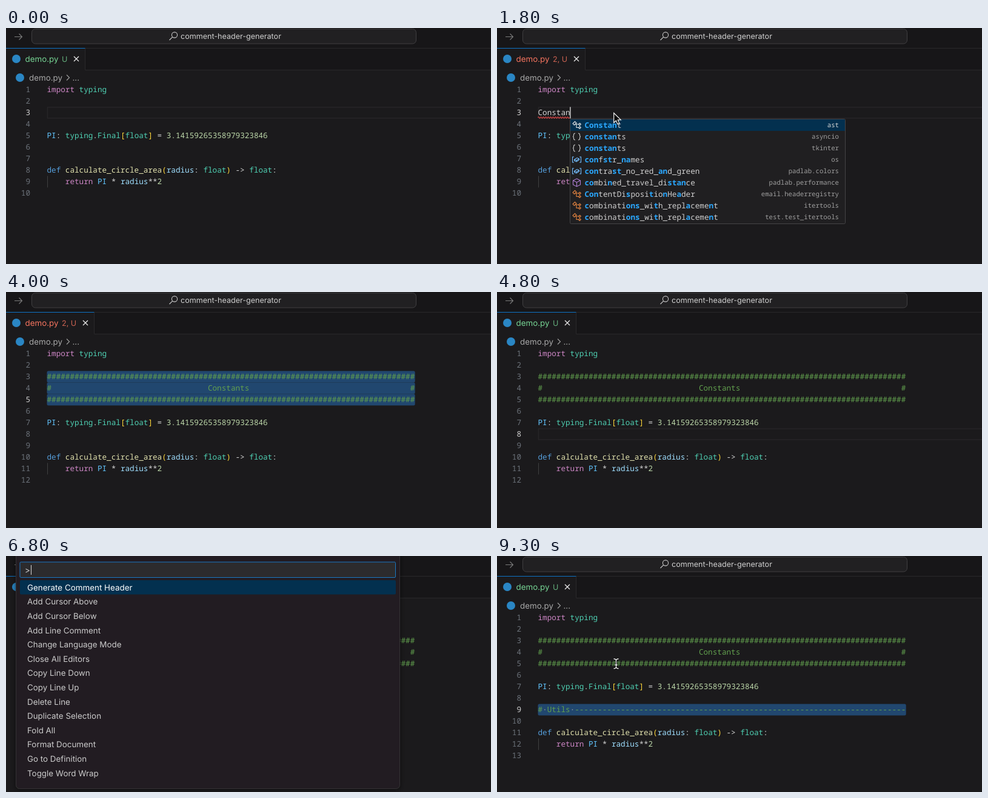
An HTML page that plays this animation: 800 by 390 pixels, repeating every 9.4 s.

```html
<!DOCTYPE html>
<html lang="en">
<head>
<meta charset="utf-8">
<title>Editor demo</title>
<style>
html, body { margin: 0; width: 100%; height: 100%; overflow: hidden; background: #1b1a1c; }
svg { display: block; width: 800px; height: 390px; }
text { white-space: pre; text-rendering: geometricPrecision; font-variant-ligatures: none; }
.ui { font-family: Inter, sans-serif; font-size: 13.4px; }
.code { font-family: "Noto Sans Mono", monospace; font-size: 12.65px; font-weight: 500; }
.small { font-family: "Noto Sans Mono", monospace; font-size: 10.7px; font-weight: 500; }
</style>
</head>
<body>
<svg id="stage" viewBox="0 0 800 390"></svg>
<script>
const stage = document.getElementById('stage');
const LOOP = 9400, STEP = 100, LEFT = 67.5, CHAR = 7.59, ROW = 19;
const C = {
  bg: '#1b1a1c', bar: '#171618', line: '#2a292b',
  key: '#cd86c5', type: '#4fd0b3', name: '#62c6ff', arg: '#9fdfff', num: '#bbd6a8',
  def: '#569fdc', fn: '#e2e2ae', par: '#ffd83a', note: '#62a04e', text: '#d6d6d6',
  blue: '#2aa8ff', pick: '#03304f', sel: '#21476f', dimSel: '#414143', red: '#f14c4c'
};

const esc = s => s.replace(/&/g, '&amp;').replace(/</g, '&lt;').replace(/>/g, '&gt;');
const span = (fill, s, extra = '') => `<tspan fill="${fill}" ${extra}>${esc(s)}</tspan>`;
const label = (cls, x, y, fill, s, extra = '') =>
  `<text class="${cls}" x="${x}" y="${y}" fill="${fill}" ${extra}>${esc(s)}</text>`;
const rect = (x, y, w, h, fill, extra = '') =>
  `<rect x="${x}" y="${y}" width="${w}" height="${h}" fill="${fill}" ${extra}/>`;
const path = (d, stroke, w = 1, fill = 'none', extra = '') =>
  `<path d="${d}" stroke="${stroke}" stroke-width="${w}" fill="${fill}" ${extra}/>`;
const mid = n => 102 + ROW * (n - 1);
const colX = n => LEFT + CHAR * n;
// Last entry [time, value] whose time has passed
const at = (t, list) => list.reduce((v, [from, to]) => t >= from ? to : v, list[0][1]);

// ---- document text ----
const IMPORT = [[C.key, 'import '], [C.type, 'typing']];
const CONST = [[C.name, 'PI'], [C.text, ': '], [C.type, 'typing'], [C.text, '.'], [C.type, 'Final'],
  [C.par, '['], [C.type, 'float'], [C.par, ']'], [C.text, ' = '], [C.num, '3.14159265358979323846']];
const DEF = [[C.def, 'def '], [C.fn, 'calculate_circle_area'], [C.par, '('], [C.arg, 'radius'],
  [C.text, ': '], [C.type, 'float'], [C.par, ')'], [C.text, ' -> '], [C.type, 'float'], [C.text, ':']];
const RET = [[C.key, '    return '], [C.name, 'PI'], [C.text, ' * '], [C.arg, 'radius'],
  [C.text, '**'], [C.num, '2']];
const note = s => [[C.note, s]];
const BAR = note('#'.repeat(80));
const HEAD = [BAR, note('#' + ' '.repeat(34) + 'Constants' + ' '.repeat(35) + '#'), BAR];
const UTIL = note('# Utils ' + '-'.repeat(72));

// ---- completion lists: brackets mark matched letters ----
const FIRST = [
  ['class', '[Constan]t', 'ast'], ['mod', '[constan]ts', 'asyncio'], ['mod', '[constan]ts', 'tkinter'],
  ['var', '[con]f[st]r_[na]mes', 'os'], ['var', '[con]tra[st]_no_red_[an]d_green', 'padlab.colors'],
  ['cube', '[co]mbi[n]ed_travel_di[stan]ce', 'padlab.performance'],
  ['class', '[Con]tentDi[s]posi[t]io[n]He[a]der', 'email.headerregistry'],
  ['class', '[c]ombinati[ons]_wi[t]h_repl[a]ceme[n]t', 'itertools'],
  ['class', '[c]ombinati[ons]_wi[t]h_repl[a]ceme[n]t', 'test.test_itertools'],
  ['class', '[Con]nectionError', ''], ['class', '[Con]nectionResetError', ''], ['class', '[Con]textDecorator', 'contextlib']
];
const SECOND = [
  ['mod', '[utils]', 'email'], ['cube', '[u]pda[t]e_[li]ne[s]_cols', 'curses'],
  ['var', '_[U]ninstan[ti]ab[l]e[S]tructseq', 'sys'],
  ['class', '[U]nicodeError', ''], ['class', '[U]serWarning', ''],
  ['class', '[U]nboundLocalError', ''], ['class', '[U]nicodeWarning', '']
];
const COMMANDS = ['Generate Comment Header', 'Add Cursor Above', 'Add Cursor Below', 'Add Line Comment',
  'Change Language Mode', 'Close All Editors', 'Copy Line Down', 'Copy Line Up', 'Delete Line',
  'Duplicate Selection', 'Fold All', 'Format Document', 'Go to Definition', 'Toggle Word Wrap'];

const TYPED_A = [[0, 0], [700, 1], [1000, 2], [1200, 3], [1400, 4], [1600, 5], [1700, 6], [1800, 7], [1900, 8], [2100, 9]];
const TYPED_B = [[0, 0], [5200, 1], [5400, 2], [5500, 3], [5700, 4], [5800, 5]];

function icon(kind, x, y, on) {
  const tint = on ? '#e8e8e8' : { class: '#e58440', mod: '#cccccc', var: '#75beff', cube: '#b180d7' }[kind];
  const d = {
    class: 'M-6.5,-2.5 l3.5,-3.5 2.5,2.5 -3.5,3.5z M-2.5,-1.5 H3 M-.5,-1.5 V4 H3 M3,-1.2 l2,-2 1.8,1.8 -2,2z M3,4.2 l2,-2 1.8,1.8 -2,2z',
    mod: 'M-2.5,-5.5 q-2.5,0 -2.5,2.5 q0,3 -1.5,3 q1.5,0 1.5,3 q0,2.5 2.5,2.5 M2.5,-5.5 q2.5,0 2.5,2.5 q0,3 1.5,3 q-1.5,0 -1.5,3 q0,2.5 -2.5,2.5',
    var: 'M-4.5,-4.5 h-2.5 v9 h2.5 M4.5,-4.5 h2.5 v9 h-2.5 M-4,0 l4.5,-3 3.5,1.5 v2 l-4.5,3 -3.5,-1.5z M-4,0 l3.5,1.5 4.5,-3 M-.5,1.5 v2',
    cube: 'M0,-6.5 l6,3 v7 l-6,3 -6,-3 v-7z M-6,-3.5 l6,3 6,-3 M0,-.5 v7'
  }[kind];
  return path(d, tint, 1.1, 'none', `transform="translate(${x} ${y})"`);
}

function marked(s, count) {
  let hot = false, out = '';
  for (const ch of s) {
    if (ch === '[' || ch === ']') { hot = ch === '['; continue; }
    out += hot && count-- > 0 ? span(C.blue, ch, 'font-weight="700"') : span('#d0d0d0', ch);
  }
  return out;
}

function popup(rows, x, y, count) {
  let out = rect(x, y, 454, rows.length * ROW + 2, '#201f21', 'stroke="#454446" rx="2"');
  rows.forEach(([kind, name, from], i) => {
    const cy = y + 10 + i * ROW;
    if (!i) out += rect(x + .5, y + .5, 453, ROW, C.pick);
    out += icon(kind, x + 11, cy, !i);
    out += `<text class="code" x="${x + 24}" y="${cy + 4.1}">${marked(name, count)}</text>`;
    out += label('small', x + 443.5, cy + 3.6, i ? '#a0a0a0' : '#d8d8d8', from, 'text-anchor="end"');
  });
  return out;
}

function quickPick(hint, value, rows, chosen, bottom) {
  let out = rect(16.5, -6, 633, bottom + 6, '#201f21', 'stroke="#343335" rx="6" filter="url(#drop)"');
  out += rect(23, 10, 619.5, 25.5, '#2c2b2d', 'stroke="#1a79c4" rx="1.5"');
  out += label('ui', 31, 28, value ? '#cccccc' : '#8c8c8c', value || hint);
  out += rect(value ? 41 : 30.5, 15, 1, 16, '#d8d8d8');
  rows.forEach((s, i) => {
    const cy = 52 + i * 23.6;
    if (i === chosen) out += rect(23, cy - 12, 620, 23.6, C.pick, 'rx="2"');
    out += label('ui', 35, cy + 4.8, i === chosen ? '#ffffff' : '#cccccc', s);
  });
  return out;
}

function chrome(bad, search) {
  const w = bad ? 145.5 : 130.5, tint = bad ? '#f5745f' : '#76d494', cx = bad ? 131 : 116;
  let out = rect(0, 0, 800, 69, C.bar) + path('M0,33.5 H800 M0,69.5 H800', C.line);
  out += path('M14,14.5 H26 M21.5,9.5 L26.5,14.5 L21.5,19.5', '#7c7c7c', 1.1);
  if (search) {
    out += rect(42.5, 1.5, 634, 24.5, '#212022', 'stroke="#403f41" rx="6"');
    out += '<circle cx="278" cy="11.5" r="4.6" fill="none" stroke="#c4c4c4" stroke-width="1.1"/>';
    out += path('M274.7,14.8 L269.5,20', '#c4c4c4', 1.2);
    out += label('ui', 288, 18.4, '#d0d0d0', 'comment-header-generator', 'style="font-size:12.57px"');
  }
  out += rect(0, 33, w, 37, C.bg) + path(`M${w},34 V69`, C.line) + path(`M0,33.5 H${w}`, '#0e74c6', 1.2);
  out += '<circle cx="17" cy="51" r="7" fill="#2a86c4"/><circle cx="23" cy="82" r="7" fill="#2a86c4"/>';
  out += label('ui', 31.5, 56, tint, 'demo.py');
  out += label('ui', 92, 56, tint, bad ? '2, U' : 'U', 'opacity=".8" style="font-size:12.6px"');
  out += path(`M${cx - 4},47 l8,8 m0,-8 l-8,8`, '#e8e8e8', 1.3);
  out += label('ui', 38, 86.6, '#a8a8a8', 'demo.py') + path('M100,77.5 l4.5,4.5 -4.5,4.5', '#a0a0a0', 1.1);
  return out + label('ui', 109.5, 86.6, '#a8a8a8', '...');
}

function squiggle(line, n) {
  const y = mid(line) + 8;
  let d = `M${LEFT},${y}`;
  for (let x = 0; x < n * CHAR - 2; x += 4) d += ' q1,-2.4 2,0 t2,0';
  return path(d, C.red, 1.1);
}

const bulb = line => {
  const y = mid(line) - 1.5;
  return `<circle cx="76" cy="${y - 1}" r="4.9" fill="#ffcc0a"/>` + rect(73.7, y + 2, 4.6, 3, '#ffcc0a') +
    path(`M73.8,${y + 6} h4.4 M74.6,${y + 7.6} h2.8`, '#e6b60a', 1);
};
const band = (line, n, fill) => rect(LEFT, mid(line) - 9.5, n * CHAR, ROW, fill, 'rx="2.5"');
const arrow = (x, y) =>
  path(`M${x},${y} v16 l3.7,-3.5 2.5,5.8 2.9,-1.3 -2.5,-5.6 h5z`, '#f4f4f4', 1.2, '#080808');
const beam = (x, y) => {
  const d = `M${x - 4},${y - 8} q4,0 4,3 q0,-3 4,-3 M${x},${y - 5} v10 M${x - 4},${y + 8} q4,0 4,-3 q0,3 4,3 M${x - 2},${y + 2} h4`;
  return path(d, '#0a0a0a', 3) + path(d, '#f4f4f4', 1.3);
};

function scene(t) {
  const header = t >= 3900, added = t >= 5000, done = t >= 8000;
  const a = at(t, TYPED_A), b = at(t, TYPED_B);
  const palette = (t >= 2600 && t < 3100) || (t >= 6700 && t < 7400);
  const picker = (t >= 3100 && t < 3900) || (t >= 7400 && t < 8000);
  const overlay = palette || picker;
  const selA = t >= 2400 && !header, selB = t >= 6400 && !done;
  const selHead = header && t < 4300;
  const bad = (t >= 1000 && t < 4200) || (t >= 5400 && t < 8500);
  const active = at(t, [[0, 3], [3900, 5], [4300, 6], [4400, 7], [4500, 8], [5000, 9]]);

  const lines = [IMPORT, []];
  if (header) lines.push(...HEAD); else lines.push([[C.text, 'Constants'.slice(0, a)]]);
  lines.push([], CONST, []);
  if (added) lines.push(done ? UTIL : [[C.text, 'Utils'.slice(0, b)]]);
  lines.push([], DEF, RET, []);

  let out = '<defs><filter id="drop" x="-5%" y="-10%" width="110%" height="130%">' +
    '<feDropShadow dx="0" dy="1" stdDeviation="4" flood-color="#000" flood-opacity=".55"/></filter></defs>';
  out += rect(0, 0, 800, 390, C.bg) + chrome(bad, !overlay);

  // selection or current line
  const selected = selA || selB || selHead || done;
  if (!selected) out += rect(68.5, mid(active) - 9, 740, 18, 'none', 'stroke="#262527" stroke-width="1.5"');
  if (selA) out += band(3, 9, overlay ? C.dimSel : C.sel);
  if (selB) out += band(9, 5, overlay ? C.dimSel : C.sel);
  if (selHead) out += [3, 4, 5].map(n => band(n, 80, C.sel)).join('');
  if (done) {
    out += band(9, 80, C.sel);
    for (const n of [1, 7]) out += `<circle cx="${colX(n + .5)}" cy="${mid(9)}" r=".9" fill="#7d8a96"/>`;
  }

  lines.forEach((parts, i) => {
    const y = mid(i + 1) + 4.3;
    out += label('code', 40, y, i + 1 === active ? '#d0d0d0' : '#6c727a', String(i + 1), 'text-anchor="end"');
    if (parts.length) out += `<text class="code" x="${LEFT}" y="${y}">${parts.map(p => span(...p)).join('')}</text>`;
    if (parts === RET) out += rect(68, mid(i + 1) - 9.5, 1, ROW, '#404041');
  });

  const wordA = a && !header, wordB = b && !done;
  if (wordA && bad) out += squiggle(3, a);
  if (wordB && bad) out += squiggle(9, b);
  if (selA) out += bulb(2);
  if (t >= 5800 && !done) out += bulb(8);

  // caret
  const col = header ? b : a;
  const typing = (t >= 700 && t < 2400) || (t >= 5000 && t < 6400);
  const blink = (t >= 100 && t < 600) || (t >= 4300 && t < 4800);
  if (typing || blink) out += rect(colX(col) - .5, mid(active) - 9.5, 1.5, ROW, '#c8c8c8');

  if (a && t < 2300) out += popup(a < 5 ? FIRST : FIRST.slice(0, 9), Math.round(colX(a)) - .5, 150.5, a);
  if (b && t < 6100) out += popup(b < 2 ? SECOND : SECOND.slice(0, 3), Math.round(colX(b)) + .5, 263.5, b);
  if (palette) out += quickPick('', '>', COMMANDS, 0, 384.5);
  if (picker) out += quickPick('Choose a comment style', '', ['Single Line', 'Multi Line'], t >= 3600 && t < 3900 ? 1 : 0, 92.5);

  if (t >= 1400 && t < 2300) out += arrow(192.7, 140.5);
  if (t >= 9100) out += beam(196.5, 140 + 19 * Math.min(2, (t - 9100) / STEP));
  return out;
}

let last = -1;
function draw(now) {
  const t = Math.floor(now % LOOP / STEP) * STEP;
  if (t !== last) { stage.innerHTML = scene(t); last = t; }
}
function tick() {
  draw(performance.now());
  requestAnimationFrame(tick);
}
tick();
</script>
</body>
</html>
```
